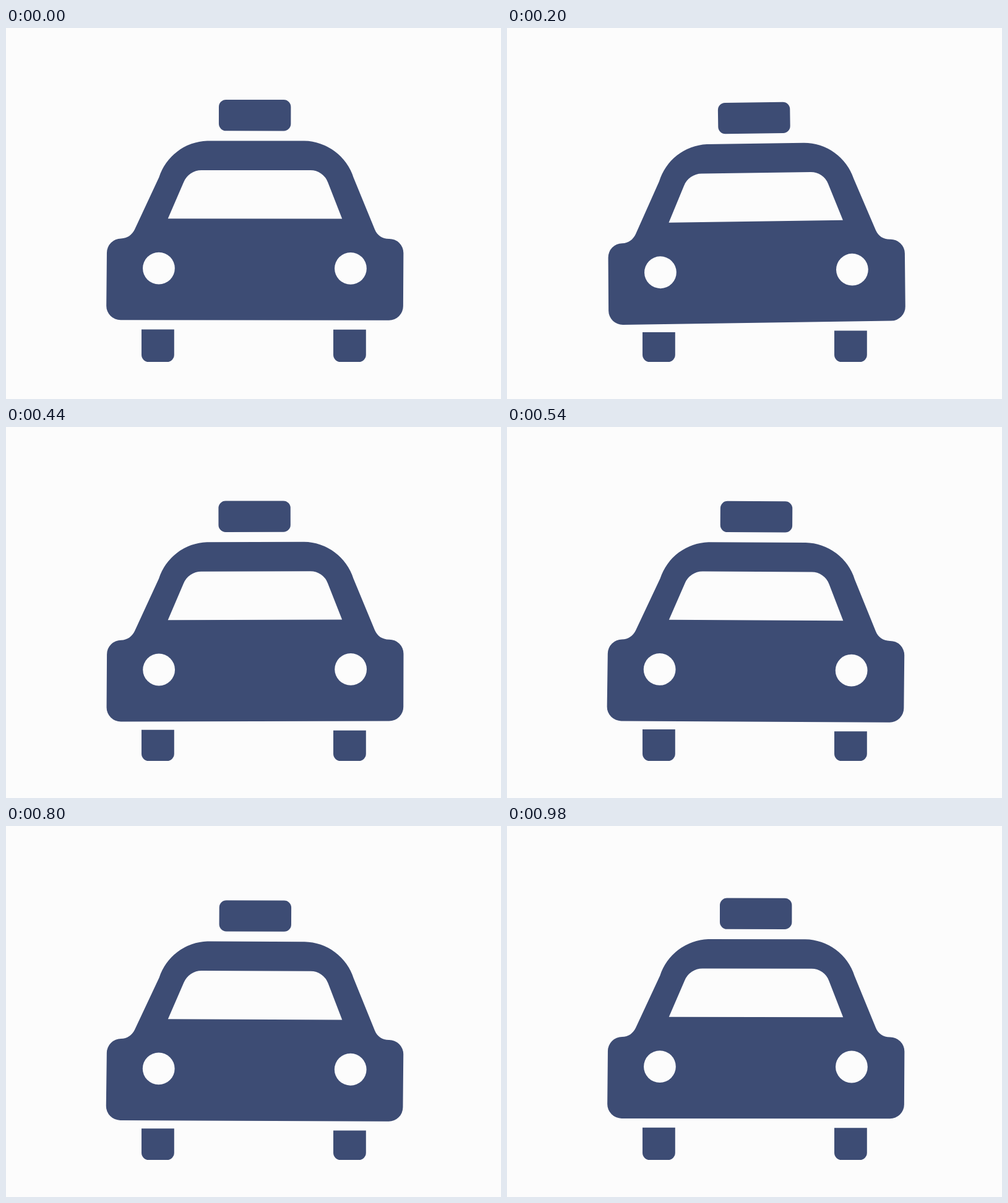
An HTML page with a canvas for the animation above (1 s loop, 800 px wide and 600 px high).

```html
<!DOCTYPE html>
<html lang="en">
<head>
<meta charset="utf-8">
<title>Taxi</title>
<style>
  html, body { margin: 0; width: 100%; height: 100%; overflow: hidden; background: #fcfcfc; }
  canvas { display: block; }
</style>
</head>
<body>
<canvas id="stage" width="800" height="600"></canvas>
<script>
const ctx = document.getElementById('stage').getContext('2d');
const LOOP = 1000;
const BG = '#fcfcfc';
const BLUE = '#3d4c74';
const PIVOT = { x: 402.5, y: 327 };

const body = new Path2D(`
  M162.3 449.4 L163 363.7 A23 23 0 0 1 186 340.7
  C196 340.5 203.5 335 208 326 L247.2 241.5
  A85 85 0 0 1 325 182.5 H482 A85 85 0 0 1 561.5 241.5
  L596 325.5 C600 335 608 340.7 619 340.7
  A23 23 0 0 1 642.4 363.7 L642 449.4
  A23 23 0 0 1 619 472.5 H185.3 A23 23 0 0 1 162.3 449.4 Z`);

const glass = new Path2D(`
  M261.7 308.4 L287 249.5 A31 31 0 0 1 316 230
  H492 A30 30 0 0 1 520.2 249.5 L543.2 308.4 Z`);

// Three even hops per loop: down and back up at constant speed
function hop(p) {
  const phase = (p * 3) % 1;
  return 5.4 * (1 - Math.abs(2 * phase - 1));
}

// Leans left, eases off until mid-loop, then rocks right and back
function tiltDegrees(p) {
  const s = p * 6;
  if (s < 3) return 0.06 - Math.min(s, (3 - s) / 2);
  return 0.06 + Math.max(0, 1 - Math.abs(s - 4));
}

function box(x, y, w, h, radii) {
  ctx.beginPath();
  ctx.roundRect(x, y, w, h, radii);
  ctx.fill();
}

function disc(x, y, r) {
  ctx.beginPath();
  ctx.arc(x, y, r, 0, Math.PI * 2);
  ctx.fill();
}

function wheel(x, drop) {
  const top = 487.5 + drop;
  box(x, top, 52.8, 540 - top, [0, 0, 11.5, 11.5]);
}

function draw(p) {
  const drop = hop(p);
  const tilt = tiltDegrees(p);

  ctx.fillStyle = BG;
  ctx.fillRect(0, 0, 800, 600);

  // Each wheel is squeezed by the hop and by the lean on its side
  ctx.fillStyle = BLUE;
  wheel(219, 0.55 * drop - 2.6 * tilt);
  wheel(529, drop + 2.6 * tilt);

  ctx.save();
  ctx.translate(PIVOT.x, PIVOT.y + drop);
  ctx.rotate(tilt * Math.PI / 180);
  ctx.translate(-PIVOT.x, -PIVOT.y);
  box(343.8, 116, 116.4, 50.3, 11.5);
  ctx.fill(body);
  ctx.fillStyle = BG;
  ctx.fill(glass);
  disc(247, 388.7, 25.9);
  disc(557, 388.7, 25.9);
  ctx.restore();
}

function tick(now) {
  draw((now % LOOP) / LOOP);
  requestAnimationFrame(tick);
}

draw(0);
requestAnimationFrame(tick);
</script>
</body>
</html>
```
